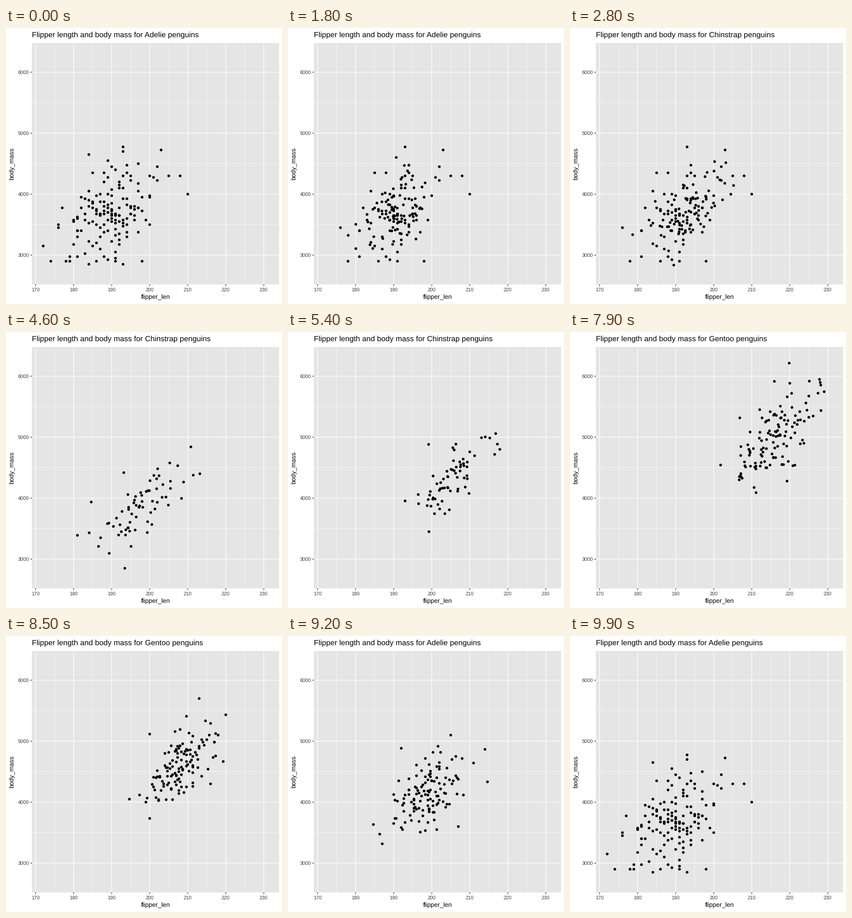
These frames come from a looping animation (480 px wide and 480 px high, 10 s). A matplotlib script:

```python
import numpy as np
import matplotlib.pyplot as plt
from matplotlib.animation import FuncAnimation

plt.rcParams["font.family"] = "Liberation Sans"
plt.rcParams["text.hinting"] = "none"

SIZE, DPI = 480, 72          # at 72 dpi one point is one pixel
LEFT, RIGHT, TOP, BOTTOM = 45.2, 474.5, 26.0, 445.9
X_MIN, X_MAX, Y_MIN, Y_MAX = 169.05, 233.95, 2520, 6480
PANEL, TICK, LABEL = "#e5e5e5", "#262626", "#404040"
MOVING = 68                  # birds that take part in every move

rng = np.random.default_rng(11)


def bell(n):
    """Evenly spaced quantiles of a bell curve, in shuffled order."""
    u = (rng.permutation(n) + 0.5) / n
    return np.log(u / (1 - u)) / 1.702


def cloud(n, center, spread, corr, low, high, step):
    """Correlated flipper lengths and masses, rounded like measurements."""
    a, b = bell(n), bell(n)
    b = corr * a + np.sqrt(1 - corr ** 2) * b
    pts = np.array(center) + np.column_stack([a, b]) * spread
    pts = np.clip(pts, low, high)
    return np.round(pts / [1, step]) * [1, step]


# outlying birds: each row is one dot's place in the three species
KEYS = np.array([
    [(197, 4500), (181, 3700), (221, 6300)],
    [(172, 3150), (191, 3700), (210, 4600)],
    [(180, 3550), (210, 4800), (219, 5250)],
    [(181, 3300), (192, 2700), (208, 4350)],
    [(184, 4650), (205, 4500), (208, 5350)],
    [(184, 3900), (203, 4100), (230, 6050)],
    [(181, 3625), (178, 3250), (211, 4800)],
    [(179, 2975), (212, 4300), (225, 5400)],
], float)
LATE = [(178, 2900), (176, 3450), (203, 4725), (205, 4300), (208, 4300),
        (210, 4000)]
rest = MOVING - len(KEYS)

adelie = np.vstack([
    KEYS[:, 0],
    cloud(rest, (188.5, 3700), (6, 430), 0.45, (174, 2850), (200, 4700), 25),
    LATE,
    cloud(77, (191, 3680), (4.8, 420), 0.4, (181, 2900), (202, 4775), 25),
])
chinstrap = np.vstack([
    KEYS[:, 1],
    cloud(rest, (195.5, 3720), (6, 330), 0.55, (181, 2900), (210, 4550), 25),
])
gentoo = np.vstack([
    KEYS[:, 2],
    cloud(rest, (217, 5020), (6, 480), 0.7, (208, 3950), (231, 6000), 50),
    [(203, 4625)],
    cloud(54, (218, 5120), (6, 430), 0.7, (208, 4375), (230, 6000), 25),
])

# first moving frame, arrival frame, steps, from, to
LEGS = [
    (12, 33, 22, adelie, chinstrap),
    (46, 66, 22, chinstrap, gentoo),
    (79, 99, 21, gentoo, adelie),
]


def positions(frame):
    pts = adelie
    for first, last, steps, start, end in LEGS:
        if frame >= last:
            pts = end
        elif frame >= first:
            p = 1 - (last - frame) / steps
            k = min(len(start), len(end))
            # birds without a partner wait until the arrival
            return np.vstack([(1 - p) * start[:k] + p * end[:k], start[k:]])
    return pts


def species(frame):
    if 23 <= frame < 56:
        return "Chinstrap"
    if 56 <= frame < 90:
        return "Gentoo"
    return "Adelie"


def px(length):
    return LEFT + (length - X_MIN) / (X_MAX - X_MIN) * (RIGHT - LEFT)


def py(mass):
    return BOTTOM - (mass - Y_MIN) / (Y_MAX - Y_MIN) * (BOTTOM - TOP)


fig = plt.figure(figsize=(SIZE / DPI, SIZE / DPI), dpi=DPI, facecolor="white")
ax = fig.add_axes([0, 0, 1, 1])
ax.set_xlim(0, SIZE)
ax.set_ylim(SIZE, 0)
ax.axis("off")

ax.add_patch(plt.Rectangle((LEFT, TOP), RIGHT - LEFT, BOTTOM - TOP,
                           fc=PANEL, lw=0, zorder=0))


def line(xs, ys, color, width, z):
    ax.plot(xs, ys, color=color, lw=width, zorder=z, snap=False,
            solid_capstyle="butt")


def grid(lengths, masses, width, z):
    for v in lengths:
        line([px(v)] * 2, [TOP, BOTTOM], "white", width, z)
    for v in masses:
        line([LEFT, RIGHT], [py(v)] * 2, "white", width, z)


grid(range(175, 230, 10), range(3500, 6000, 1000), 0.53, 1)
grid(range(170, 231, 10), range(3000, 6001, 1000), 1.07, 2)

for v in range(170, 231, 10):
    line([px(v)] * 2, [BOTTOM, BOTTOM + 2.75], TICK, 1.07, 2)
    ax.text(px(v), 457.5, str(v), size=8.8, color=LABEL, ha="center",
            va="baseline")
for v in range(3000, 6001, 1000):
    line([LEFT - 2.75, LEFT], [py(v)] * 2, TICK, 1.07, 2)
    ax.text(40.2, py(v) + 3.2, str(v), size=8.8, color=LABEL, ha="right",
            va="baseline")

ax.text((LEFT + RIGHT) / 2, 471.6, "flipper_len", size=11, ha="center",
        va="baseline")
ax.text(14.2, (TOP + BOTTOM) / 2, "body_mass", size=11, rotation=90,
        rotation_mode="anchor", ha="center", va="baseline")
title = ax.text(LEFT - 0.2, 16, "", size=13.2, va="baseline")

dots = ax.scatter([], [], color="black", lw=0, zorder=3)
dots.set_sizes([4.7 ** 2] * 2)   # two equal sizes keep subpixel placement


def draw(frame):
    pts = positions(frame)
    dots.set_offsets(np.column_stack([px(pts[:, 0]), py(pts[:, 1])]))
    title.set_text("Flipper length and body mass for "
                   f"{species(frame)} penguins")
    return dots, title


anim = FuncAnimation(fig, draw, frames=100, interval=100, repeat=True,
                     repeat_delay=0, init_func=lambda: draw(0))
plt.show()
```
